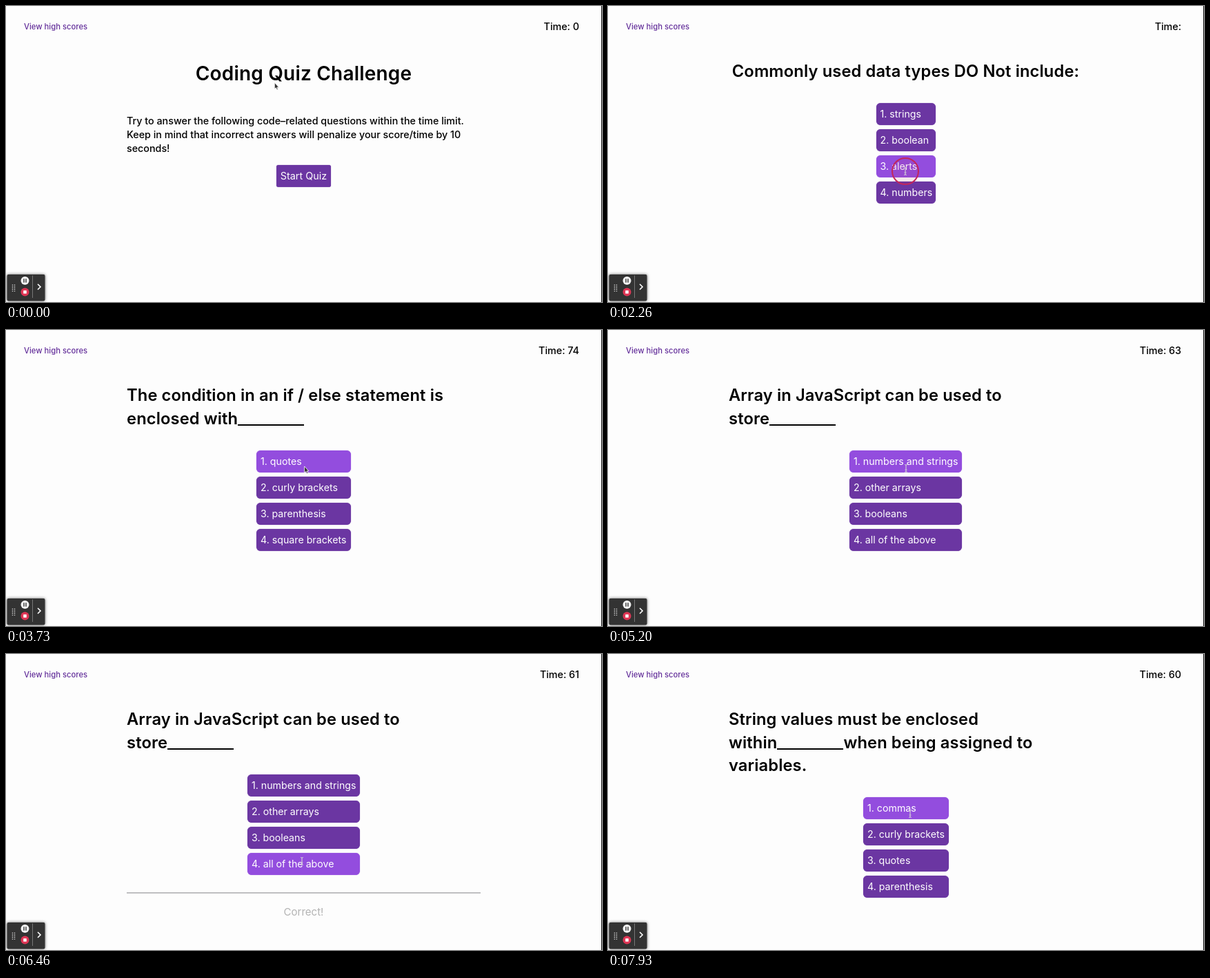
Animation of 864 by 430 pixels, one loop 8 s. Source, as an HTML page:

```html
<!DOCTYPE html>
<html lang="en">
<head>
<meta charset="utf-8">
<title>Coding Quiz Challenge</title>
<style>
  html, body { margin: 0; width: 100%; height: 100%; overflow: hidden; background: #fdfdfd; }
  body { position: relative; font: 450 14.3px/20px Inter, "Open Sans", sans-serif; font-optical-sizing: none; color: #000; }
  body > *, .scene > * { position: absolute; margin: 0; white-space: nowrap; }
  .scene { inset: 0; }
  #link { left: 26px; top: 19.5px; font-size: 11.25px; color: #65319b; }
  #time { right: 33px; top: 19.5px; white-space: pre; }
  h1, h2 { font-weight: 600; }
  h1 { left: 0; width: 863px; top: 78px; text-align: center; font-size: 28px; line-height: 40px; letter-spacing: .2px; }
  h2 { left: 175px; top: 78px; width: 513px; font-size: 23.7px; line-height: 33.6px; letter-spacing: .12px; }
  h2.single { text-align: center; }
  .blank { display: inline-block; width: 96px; border-bottom: 2px solid; position: relative; top: 2px; }
  .intro { left: 175px; top: 156.5px; }
  .button { --fill: #6b36a2; box-sizing: border-box; height: 32px; padding: 0 6px; font-size: 14.2px; font-weight: 400; line-height: 32px;
    border-radius: 6px; color: #fff; background: var(--fill); box-shadow: 0 0 1px var(--fill); }
  .button.hover { --fill: #934dde; }
  .start { left: 392px; top: 231px; width: 79px; padding: 0; text-align: center; font-size: 14.4px; border-radius: 3px; }
  .feedback { left: 175px; width: 513px; border-top: 2px solid #bfbfc1; padding-top: 17px; text-align: center; font-size: 15px; font-weight: 400; color: #b3b3b3; }
  #overlay { left: 0; top: 0; }
</style>
</head>
<body>
<div id="link">View high scores</div>
<div id="time"></div>
<div class="scene">
  <h1>Coding Quiz Challenge</h1>
  <p class="intro">Try to answer the following code–related questions within the time limit.<br>Keep in mind that incorrect answers will penalize your score/time by 10<br>seconds!</p>
  <div class="button start"><span>Start Quiz</span></div>
</div>
<svg id="overlay" width="864" height="430" fill="none">
  <path d="M863.5 0V430" stroke="#111"/>
  <g style="filter:drop-shadow(0 0 2px #0009)"><rect x="1.500" y="390" width="55" height="38.500" rx="2" fill="#333"/></g>
  <path d="M38.500 391.500V424" stroke="#777"/>
  <path d="M9.500 404.700v10.500M12.500 404.700v10.500" stroke="#ddd" stroke-width="1.400" stroke-dasharray="1.400 1.500"/>
  <circle cx="27.500" cy="399" r="6" fill="#f4f4f4"/>
  <path d="M26 396.300v5.400M29 396.300v5.400" stroke="#333" stroke-width="1.400"/>
  <circle cx="27.500" cy="415.500" r="6" fill="#de3554"/>
  <rect x="25.200" y="413.200" width="4.600" height="4.600" rx=".5" fill="#fff"/>
  <path d="M46 404l4 4-4 4" stroke="#fff" stroke-width="1.600"/>
  <circle id="ring" r="19" stroke="#c3265c" stroke-width="2" fill="#b0205018"/>
  <g id="pointer">
    <path class="arrow" d="M0 0V9.200L2.100 7.400 3.500 10.600 5 9.900 3.700 6.900H6.300Z" fill="#333" stroke="#fff" stroke-width=".8"/>
    <path class="hand" d="M-1.700-4.500q1-1 1.700 0V-1l3.300.8q1.200.3 1 1.800L3.600 5H-1.400L-4 1q0-1.400 2.300-.2Z" fill="#fff" stroke="#333" stroke-width=".9"/>
    <path class="beam" d="M-2-5.500Q0-5.500 0-4Q0-5.500 2-5.500M0-4V4M-2 5.500Q0 5.500 0 4Q0 5.500 2 5.500M-1.500 2H1.500" stroke="#cfc6d6" stroke-width="1.200"/>
  </g>
</svg>
<script>
const LOOP = 8000;
const BLANK = '<span class="blank"></span>';
const overlay = document.getElementById('overlay');
const pointer = document.getElementById('pointer');
const ring = document.getElementById('ring');
const timeLabel = document.getElementById('time');

const questions = [
  { from: 1400, answered: 2330, result: 'Correct!', left: 388.5, width: 86.5,
    title: ['Commonly used data types DO Not include:'],
    options: ['strings', 'boolean', 'alerts', 'numbers'] },
  { from: 3130, answered: 4060, result: 'Wrong!', left: 363, width: 137,
    title: ['The condition in an if / else statement is', 'enclosed with' + BLANK],
    options: ['quotes', 'curly brackets', 'parenthesis', 'square brackets'] },
  { from: 4860, answered: 6130, result: 'Correct!', left: 350, width: 163,
    title: ['Array in JavaScript can be used to', 'store' + BLANK],
    options: ['numbers and strings', 'other arrays', 'booleans', 'all of the above'] },
  { from: 7000, answered: Infinity, result: '', left: 370, width: 123.5,
    title: ['String values must be enclosed', 'within' + BLANK + 'when being assigned to', 'variables.'],
    options: ['commas', 'curly brackets', 'quotes', 'parenthesis'] },
];

// Pointer stops: time, x, y
const stops = [
  [0, 389.3, 111.3], [60, 389.3, 111.3], [400, 448, 178], [600, 448, 178], [1200, 430, 252], [1460, 430, 252],
  [2200, 431, 240], [3350, 431, 240], [3730, 432.6, 198], [4000, 432, 201], [5230, 432, 201],
  [5950, 429, 301], [7300, 429, 301], [7930, 438, 232], [LOOP, 438, 232],
];
// Click rings: start, end
const clicks = [[1400, 1600], [2220, 2460], [4000, 4200], [6030, 6200]];

function buildQuestion(q) {
  const top = 141 + 33.6 * (q.title.length - 1);
  const scene = document.createElement('div');
  scene.className = 'scene';
  scene.innerHTML =
    `<h2 class="${q.title.length === 1 ? 'single' : ''}">${q.title.join('<br>')}</h2>` +
    q.options.map((text, i) =>
      `<div class="button" style="left:${q.left}px;top:${top + 38 * i}px;width:${q.width}px"><span>${i + 1}. ${text}</span></div>`
    ).join('') +
    `<div class="feedback" style="top:${top + 171}px">${q.result}</div>`;
  document.body.insertBefore(scene, overlay);
}
questions.forEach(buildQuestion);
const scenes = [...document.querySelectorAll('.scene')];

function pointerAt(t) {
  const i = stops.findIndex(s => s[0] > t);
  const [t0, x0, y0] = stops[i - 1], [t1, x1, y1] = stops[i];
  const u = (t - t0) / (t1 - t0), e = u * u * (3 - 2 * u);
  return [x0 + (x1 - x0) * e, y0 + (y1 - y0) * e];
}

function timerText(t) {
  if (t < 1400) return 'Time: 0';
  if (t < 2400) return 'Time:';
  const ticks = Math.floor((t - 2400) / 1000);
  return 'Time: ' + (75 - ticks - (t >= 4060 ? 10 : 0));
}

const inside = (box, x, y) => x >= box.left && x < box.right && y >= box.top && y < box.bottom;

function render(t) {
  const current = questions.filter(q => t >= q.from).length;
  scenes.forEach((scene, i) => scene.style.display = i === current ? '' : 'none');
  timeLabel.textContent = timerText(t);

  const question = questions[current - 1];
  if (question) {
    scenes[current].querySelector('.feedback').style.visibility = t >= question.answered ? 'visible' : 'hidden';
  }

  const [x, y] = pointerAt(t);
  let kind = 'arrow';
  for (const button of scenes[current].querySelectorAll('.button')) {
    const hover = inside(button.getBoundingClientRect(), x, y);
    button.classList.toggle('hover', hover);
    if (!hover) continue;
    if (!question) kind = 'hand';
    else if (x < button.firstChild.getBoundingClientRect().right) kind = 'beam';
  }
  pointer.setAttribute('transform', `translate(${x} ${y})`);
  for (const shape of pointer.children) {
    shape.style.display = shape.classList.contains(kind) ? '' : 'none';
  }

  const click = clicks.find(([start, end]) => t >= start && t < end);
  ring.style.opacity = click ? Math.min(1, (click[1] - t) / 100) : 0;
  ring.setAttribute('cx', x);
  ring.setAttribute('cy', y);
}

const began = performance.now();
function frame() {
  render((performance.now() - began) % LOOP);
  requestAnimationFrame(frame);
}
frame();
</script>
</body>
</html>
```
